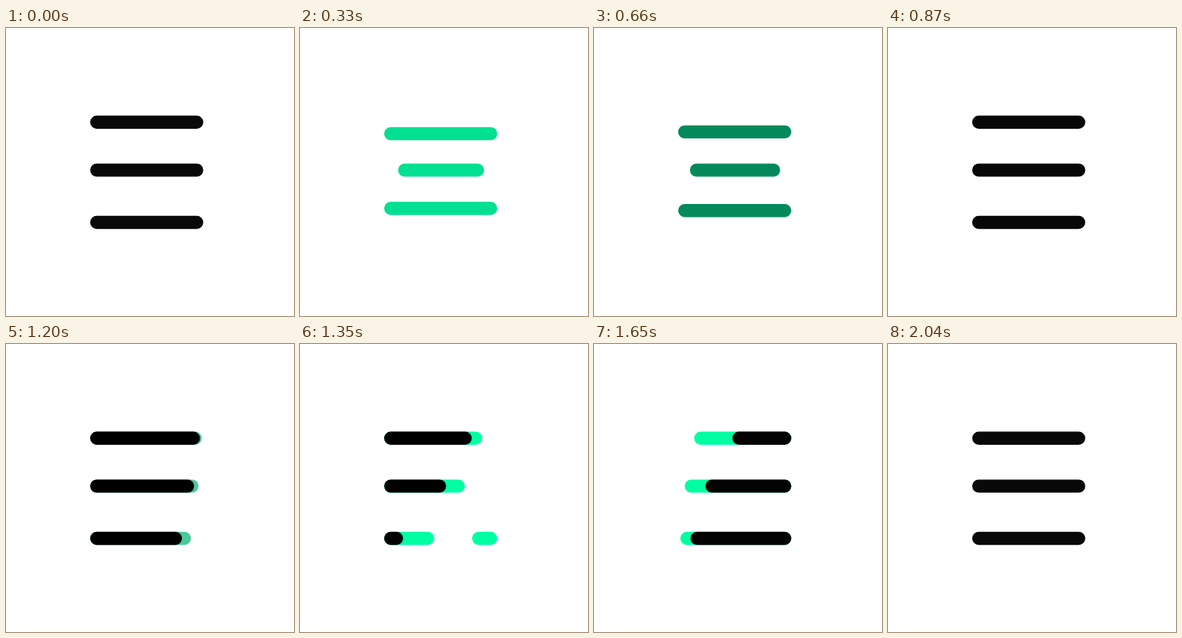
Recreate the animation shown at these times as an HTML page. Size 360 by 360 pixels, loop 2.52 s.

```html
<!DOCTYPE html>
<html lang="en">
<head>
<meta charset="utf-8">
<title>Menu icon</title>
<style>
  html, body { margin: 0; width: 100%; height: 100%; overflow: hidden; background: #fff; }
  svg { display: block; width: 100vw; height: 100vh; }
  line { stroke-width: 16.4; stroke-linecap: round; }
</style>
</head>
<body>
<svg id="stage" viewBox="0 0 360 360"></svg>
<script>
const LOOP = 2520, STEP = 30;
const LEFT = 113.4, RIGHT = 238.4, SPAN = RIGHT - LEFT;
const GREEN = [0, 255, 163];

// shift: vertical squeeze; inset: shortening at the left and right ends
const bars = [
  { y: 117.7, shift: 23.2, inset: [0, 0], order: 2 },
  { y: 177.6, shift: 0, inset: [28, 26.5], order: 1 },
  { y: 243, shift: -28, inset: [0, 0], order: 0 }
];

const SQUEEZE = { start: 233, end: 738, time: 251, tint: 150 };
const STAGGER = 67, SWEEP = 590;
const OUT_END = 1357, OUT_LAG = 45;
const IN_START = 1335, IN_LAG = 113;

const clamp = v => Math.min(1, Math.max(0, v));
const ramp = (t, a, b) => clamp((t - a) / (b - a));
const easeOut = (x, power) => 1 - Math.pow(1 - clamp(x), power);
const tint = (base, k) =>
  "rgb(" + GREEN.map(c => Math.round(base + (c - base) * k)).join(",") + ")";

const stage = document.getElementById("stage");
function addLine() {
  const el = document.createElementNS("http://www.w3.org/2000/svg", "line");
  stage.appendChild(el);
  return el;
}
for (const bar of bars) {
  bar.greenOut = addLine();
  bar.greenIn = addLine();
  bar.darkOut = addLine();
  bar.darkIn = addLine();
}

function place(el, x1, x2, y, color, opacity = 1) {
  const attrs = { x1, x2, y1: y, y2: y, stroke: color, opacity };
  for (const name in attrs) el.setAttribute(name, attrs[name]);
  el.style.display = "";
}
const hide = (...els) => els.forEach(el => { el.style.display = "none"; });

// Share of the bar still left before its retreat ends
const retreat = (t, end) => easeOut((end - t) / SWEEP, 5);
const advance = (t, start) => easeOut((t - start) / SWEEP, 5);

function drawSqueeze(bar, t) {
  const fall = easeOut((SQUEEZE.end - t) / SQUEEZE.time, 2);
  const k = Math.min(easeOut((t - SQUEEZE.start) / SQUEEZE.time, 2), fall);
  const glow = Math.min(easeOut((t - SQUEEZE.start) / SQUEEZE.tint, 2), fall);
  hide(bar.greenOut, bar.greenIn, bar.darkIn);
  place(bar.darkOut, LEFT + bar.inset[0] * k, RIGHT - bar.inset[1] * k,
    bar.y + bar.shift * k, tint(9, glow));
}

function drawSweep(bar, t) {
  const delay = bar.order * STAGGER;
  const shade = 9 * (1 - ramp(t, 840, 1100) + ramp(t, 1500, 2040));
  const dark = tint(shade, 0);

  const fade = ramp(t, 1000, 1285);
  const outs = [[bar.darkOut, 0, dark, 1], [bar.greenOut, OUT_LAG, tint(0, fade), fade]];
  for (const [el, lag, color, opacity] of outs) {
    const end = OUT_END + delay + lag;
    if (t < end) place(el, LEFT, LEFT + SPAN * retreat(t, end), bar.y, color, opacity);
    else hide(el);
  }

  const start = IN_START + delay, darkStart = start + IN_LAG;
  const filled = advance(t, darkStart);
  if (t >= start && filled < 0.99) {
    place(bar.greenIn, RIGHT - SPAN * advance(t, start), RIGHT, bar.y, tint(0, 1));
  } else hide(bar.greenIn);
  if (t >= darkStart) place(bar.darkIn, RIGHT - SPAN * filled, RIGHT, bar.y, dark);
  else hide(bar.darkIn);
}

function render(ms) {
  const t = Math.floor((ms % LOOP) / STEP + 0.001) * STEP;
  for (const bar of bars) (t < 840 ? drawSqueeze : drawSweep)(bar, t);
}

let origin = null;
function tick(now) {
  if (origin === null) origin = now;
  render(Math.max(0, now - origin));
  requestAnimationFrame(tick);
}
render(0);
requestAnimationFrame(tick);
</script>
</body>
</html>
```
